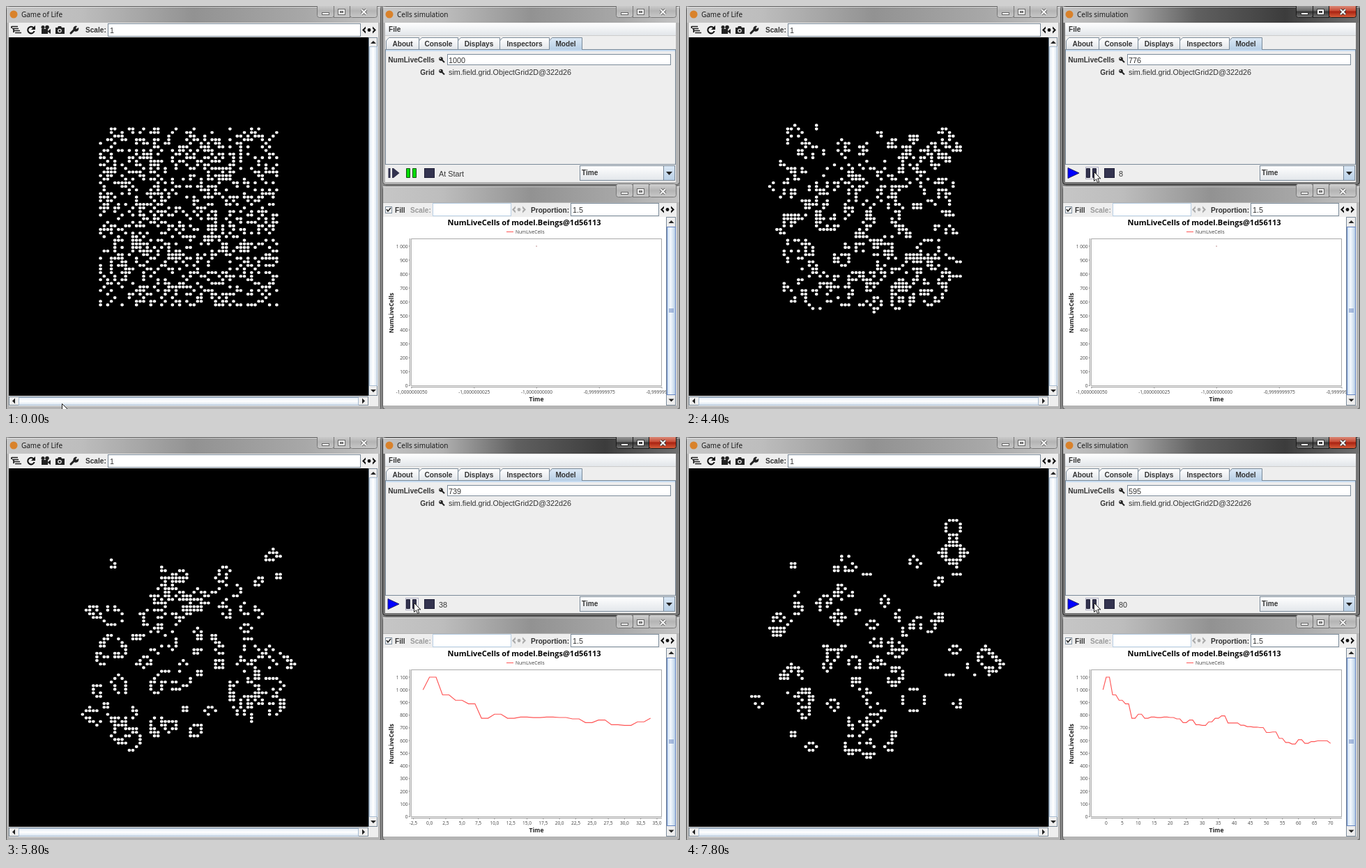
Write an HTML page that moves like this. It is 967x579 px and loops after 8 s.

```html
<!DOCTYPE html>
<html lang="en">
<head>
<meta charset="utf-8">
<title>Cells simulation</title>
<style>
html, body { margin: 0; width: 100%; height: 100%; overflow: hidden; background: #a6a6a6; }
svg { display: block; width: 967px; height: 579px; }
text { font-family: "Liberation Sans", Arial, sans-serif; font-size: 10.8px; fill: #333; white-space: pre; }
.b { font-weight: 700; font-size: 10.1px; }
.ui { font-family: "Open Sans", "Noto Sans", sans-serif; font-size: 10px; fill: #111; }
.tick { font-family: "Open Sans", "Noto Sans", sans-serif; font-size: 6.6px; fill: #404040; }
.axis { font-family: "Open Sans", "Noto Sans", sans-serif; font-size: 8.5px; font-weight: 700; fill: #222; }
</style>
</head>
<body>
<svg id="stage" viewBox="0 0 967 579" xmlns="http://www.w3.org/2000/svg"></svg>
<script>
const LOOP = 8000, TICK = 200;
const GRID = 100, CELL = 5.16, GENS = 42;
const BLUE = '#7a8a99', INK = '#33334f';

// ---------- drawing helpers ----------
const rect = (x, y, w, h, fill, stroke = 'none', more = '') =>
  `<rect x="${x}" y="${y}" width="${w}" height="${h}" fill="${fill}" stroke="${stroke}" ${more}/>`;
const box = (x, y, w, h, fill, stroke, more) => rect(x + .5, y + .5, w - 1, h - 1, fill, stroke, more);
const path = (d, fill = 'none', stroke = 'none', w = 1, more = '') =>
  `<path d="${d}" fill="${fill}" stroke="${stroke}" stroke-width="${w}" ${more}/>`;
const text = (x, y, s, cls = '', more = '') => `<text x="${x}" y="${y}" class="${cls}" ${more}>${s}</text>`;
const mid = 'text-anchor="middle"', end = 'text-anchor="end"';
const gradient = (id, vertical, ...stops) =>
  `<linearGradient id="${id}" x2="${vertical ? 0 : 1}" y2="${vertical ? 1 : 0}">` +
  stops.map(([o, c]) => `<stop offset="${o}" stop-color="${c}"/>`).join('') + '</linearGradient>';

const arrows = {
  up: 'l-4 4h8z', down: 'l-4 -4h8z', left: 'l4 -4v8z', right: 'l-4 -4v8z'
};
const arrow = (x, y, dir) => path(`M${x} ${y}${arrows[dir]}`, '#222');
const eye = (x, y, c) =>
  path(`M${x - 10} ${y}l5 -5v3l-2 2 2 2v3zM${x + 10} ${y}l-5 -5v3l2 2 -2 2v3z`, c) +
  `<circle cx="${x}" cy="${y}" r="2.4" fill="${c}"/>`;
const key = (x, y) => `<circle cx="${x}" cy="${y}" r="2.8" fill="#222"/>` +
  `<circle cx="${x - .8}" cy="${y - .8}" r=".9" fill="#eee"/>` +
  path(`M${x + 1} ${y + 1}l4 4`, 'none', '#222', 2);
const field = (x, y, w, h, stroke = BLUE) => box(x, y, w, h, '#fff', stroke);

function captionButtons(right, y, active) {
  const line = active ? '#1c1c1c' : '#777';
  const face = active ? 'url(#dark)' : 'url(#glass)';
  const x = right - 87;
  const glyph = active ? '#fff' : '#f4f4f4', rim = active ? '#333' : '#666';
  return box(x, y - 3, 25, 20, face, line, 'rx="3"') +
    box(x + 24, y - 3, 24, 20, face, line) +
    box(x + 47, y - 3, 40, 20, active ? 'url(#red)' : face, line, 'rx="3"') +
    box(x + 7, y + 9, 11, 4, glyph, rim) +
    box(x + 30, y + 4, 11, 9, glyph, rim) + box(x + 33, y + 7, 5, 3, active ? '#555' : '#999', rim) +
    path(`M${x + 64} ${y + 5}l7 7m0 -7l-7 7`, 'none', rim, 4) +
    path(`M${x + 64} ${y + 5}l7 7m0 -7l-7 7`, 'none', glyph, 2.2);
}

function frame(x, y, w, h, active) {
  const edge = active ? '#222' : '#555';
  return box(x, y, w, h, active ? '#777' : '#b4b4b4', edge, 'rx="4"') +
    rect(x + 1, y + 1, w - 2, 23, `url(#${active ? 'titleOn' : 'titleOff'})`) +
    rect(x + 1, y + 1, w - 2, 1, '#fff', 'none', 'opacity=".55"') +
    captionButtons(x + w - 5, y, active);
}
const caption = (x, s) => `<circle cx="${x}" cy="12" r="5.5" fill="#d9822b"/>` + text(x + 11, 16, s, 'ui');

// ---------- windows ----------
function worldWindow() {
  const icons =
    path('M8 29.5h9M9 32.5h9M11 35.5h9M13 38.5h9M8 29v3M11 32v6', 'none', '#222', 1.7) +
    path('M39.5 31.2A4.8 4.8 0 1 0 40.6 36', 'none', '#111', 2.1) + path('M42 28v6h-6z', '#111') +
    path('M51 33h9v7h-9zM60 36l4 -3v7l-4 -3z', '#222') +
    '<circle cx="53" cy="30.5" r="2.5" fill="#222"/><circle cx="59" cy="30.5" r="2.8" fill="#222"/>' +
    path('M71 31h3l1 -2h4l1 2h4v9h-13z', '#222') +
    '<circle cx="77" cy="35.5" r="2.8" fill="#eee"/><circle cx="77" cy="35.5" r="1.5" fill="#222"/>' +
    path('M93 39l6 -6', 'none', '#222', 3, 'stroke-linecap="round"') +
    path('M104 31l-3 2 -1 -1 2 -3a4 4 0 1 0 2 2z', '#222');
  return frame(0, 0, 538, 582) + caption(11, 'Game of Life') +
    rect(4, 24, 530, 551, '#eee') + icons + text(114, 38, 'Scale:', 'b') +
    field(146, 25, 363, 19) + text(149, 38.5, '1') + eye(521, 34.5, '#111') +
    rect(4, 45, 516, 515, '#000') +
    box(520, 45, 13, 515, '#eee', BLUE) + box(521, 58, 12, 488, 'url(#track)', '#a9bdd2') +
    arrow(527, 50, 'up') + arrow(527, 555, 'down') +
    box(4, 561, 516, 13, '#eee', BLUE) + box(18, 562, 488, 12, 'url(#trackV)', '#a9bdd2') +
    arrow(9, 567.5, 'left') + arrow(515, 567.5, 'right');
}

function controlWindow() {
  const tabs = [['About', 545, 592], ['Console', 592, 648], ['Displays', 648, 708],
    ['Inspectors', 708, 779], ['Model', 779, 826]];
  return `<g id="idle">${frame(540, 0, 427, 257)}</g><g id="active">${frame(540, 0, 427, 257, true)}</g>` +
    caption(550, 'Cells simulation') +
    rect(544, 24, 417, 229, '#eee') + rect(544, 24, 417, 18, 'url(#menu)') + rect(544, 42, 417, 1, '#ccc') +
    text(549, 37, 'File', 'b') +
    tabs.map(([s, a, b], i) =>
      path(`M${a + .5} 62.5V50l4 -4.5H${b + .5}V62.5`, i === 4 ? 'url(#tabOn)' : 'url(#menu)', BLUE) +
      text((a + b) / 2 + .5, 58, s, 'b', mid)).join('') +
    box(544, 62, 417, 166, '#eee', BLUE) + rect(780, 62, 46, 2, '#b8cfe5') +
    rect(545, 63, 415, 2, '#c8ddf2') +
    text(615, 81, 'NumLiveCells', 'b', end) + key(624, 76) + field(633, 69, 321, 16) +
    text(635, 82, '1000', '', 'id="count"') +
    text(615, 99, 'Grid', 'b', end) + key(624, 93.5) +
    text(635, 99, 'sim.field.grid.ObjectGrid2D@322d26') +
    `<g id="ready">${rect(548.5, 233, 3, 14, INK)}${path('M554 233l2 0 8.5 7 -8.5 7h-2z', INK)}</g>` +
    path('M548 232.5l16 7.5 -16 7.5z', '#00f', '#222266', 1, 'id="playing"') +
    box(573, 231, 19, 18, '#f4f4f4', '#b0b0c4', 'id="focus"') +
    path('M574.5 233.5h5v13h-5zM583.5 233.5h5v13h-5z', '#0d0', '#164f16', 1, 'id="pause"') +
    box(600, 233, 15, 14, INK, '#202038') +
    text(621, 245, 'At Start', '', 'id="clock"') +
    box(823, 229, 137, 22, 'url(#menu)', BLUE) + box(943, 229, 17, 22, 'url(#tabOn)', BLUE) +
    text(826, 243, 'Time', 'b') + path('M947 238h9l-4.5 5z', '#222');
}

function chartWindow() {
  return frame(540, 258, 427, 322) + rect(541, 283, 421, 291, '#eee') +
    box(544, 288, 10, 10, '#fff', BLUE) + path('M546 292l2 3 4 -5', 'none', '#222', 1.6) +
    text(558, 296.5, 'Fill', 'b') + text(580, 296.5, 'Scale:', 'b', 'style="fill:#999"') +
    field(612, 283, 113, 19, '#b8cfe5') + eye(736, 292.5, '#aaa') +
    text(808, 296.5, 'Proportion:', 'b', end) + field(810, 283, 127, 19) + text(813, 297, '1.5') +
    eye(949, 292.5, '#111') +
    rect(541, 303, 407, 271, '#fff') +
    box(947, 303, 14, 271, '#eee', BLUE) + box(948, 317, 13, 242, 'url(#thumb)', '#6382bf') +
    path('M951 435.5h7M951 437.5h7M951 439.5h7', 'none', '#6382bf') +
    arrow(954.5, 308, 'up') + arrow(954.5, 568.5, 'down') +
    text(743.5, 315, 'NumLiveCells of model.Beings@1d56113', 'axis', mid + ' style="font-size:11px;fill:#000"') +
    path('M718 324.5h10', 'none', '#f55') + text(731, 327, 'NumLiveCells', 'tick') +
    text(761, 568, 'Time', 'axis', mid) +
    text(0, 0, 'NumLiveCells', 'axis', mid + ' transform="translate(556 441) rotate(-90)"') +
    '<g id="chart" clip-path="url(#chartClip)"></g>';
}

// ---------- population and chart ----------
const population = [1000, 1100, 960, 918, 890, 776, 808, 776, 785, 781, 785, 782, 771, 742, 762, 725,
  720, 748, 776, 795, 739, 739, 721, 710, 706, 702, 664, 668, 617, 585, 573, 607, 578, 592, 598, 598,
  578, 583, 590, 584, 600, 595];
// the world advances on every second step; step -1 is the start
const generation = step => (step >> 1) + 1;
const refreshes = [10, 22, 34, 47, 59, 70];

function chart(last) {
  const started = last > -1, top = started ? 1100 : 1000;
  const left = 582, width = 359, span = (last + 1) * 1.1, low = -1 - (last + 1) * .05;
  const px = v => left + (v - low) / span * width;
  const py = v => 545.5 - v / top * 200.5;
  let out = box(581, 334, 360, 212, '#fff', '#aaa') +
    path('M579.5 334V546M581 547.5H941', 'none', '#999');
  for (let v = 0; v <= top; v += 100) {
    out += path(`M577.5 ${py(v)}h2`, 'none', '#999') +
      text(576.5, py(v) + 2.5, v < 1000 ? v : '1 ' + String(v).slice(1), 'tick', end);
  }
  const tick = (x, s) => path(`M${x} 547.5v2`, 'none', '#999') + text(x, 556.5, s, 'tick', mid);
  if (!started) {
    ['-1,0000000050', '-1,0000000025', '-1,0000000000', '-0,9999999975', '-0,9999999950']
      .forEach((s, i) => { out += tick(582 + i * 89.75, s); });
    return out + rect(760.5, 344.5, 1.2, 1.2, '#a66');
  }
  const unit = last < 23 ? 1 : last < 50 ? 2.5 : 5;
  for (let v = Math.ceil(low / unit) * unit; v <= low + span; v += unit) {
    out += tick(px(v), unit === 2.5 ? v.toFixed(1).replace('.', ',') : v + 0 || '0');
  }
  const points = [];
  for (let s = -1; s <= last; s++) points.push(px(s).toFixed(1) + ' ' + py(population[generation(s)]).toFixed(1));
  return out + path('M' + points.join('L'), 'none', '#f55', 1.15);
}

// ---------- Game of Life ----------
function random(seed) {
  return () => {
    seed = seed + 0x6D2B79F5 | 0;
    let r = Math.imul(seed ^ seed >>> 15, 1 | seed);
    r = r + Math.imul(r ^ r >>> 7, 61 | r) ^ r;
    return ((r ^ r >>> 14) >>> 0) / 4294967296;
  };
}

function firstWorld() {
  const rnd = random(1970), world = new Uint8Array(GRID * GRID);
  for (let y = 25; y < 75; y++)
    for (let x = 25; x < 75; x++) world[y * GRID + x] = rnd() < .37 ? 1 : 0;
  return world;
}

function evolve(world) {
  const next = new Uint8Array(world.length);
  for (let y = 1; y < GRID - 1; y++) {
    for (let x = 1; x < GRID - 1; x++) {
      const i = y * GRID + x, a = i - GRID, b = i + GRID;
      const n = world[a - 1] + world[a] + world[a + 1] + world[i - 1] + world[i + 1] +
        world[b - 1] + world[b] + world[b + 1];
      next[i] = n === 3 || n === 2 && world[i] ? 1 : 0;
    }
  }
  return next;
}

function worldPath(world) {
  let d = '';
  world.forEach((alive, i) => {
    if (!alive) return;
    const x = 6.3 + (i % GRID) * CELL, y = 47.6 + Math.floor(i / GRID) * CELL;
    d += `M${x.toFixed(1)} ${y.toFixed(1)}h.6`;
  });
  return d;
}

const worlds = [];
for (let w = firstWorld(), g = 0; g < GENS; g++, w = evolve(w)) worlds.push(worldPath(w));

// ---------- scene ----------
const stage = document.getElementById('stage');
stage.innerHTML = '<defs>' +
  gradient('titleOff', false, [0, '#c6c6c6'], [.2, '#bdbdbd'], [.5, '#929292'], [.8, '#a8a8a8'], [1, '#c4c4c4']) +
  gradient('titleOn', false, [0, '#c2c2c2'], [.2, '#b0b0b0'], [.45, '#606060'], [.75, '#3c3c3c'], [1, '#707070']) +
  gradient('glass', true, [0, '#d2d2d2'], [.5, '#b4b4b4'], [1, '#c8c8c8']) +
  gradient('dark', true, [0, '#aaa'], [.5, '#666'], [.55, '#333'], [1, '#777']) +
  gradient('red', true, [0, '#e0a090'], [.5, '#c84a34'], [.55, '#a82010'], [1, '#d8603c']) +
  gradient('menu', true, [0, '#fff'], [1, '#e2e6ea']) +
  gradient('tabOn', true, [0, '#dce9f6'], [1, '#b8cfe5']) +
  gradient('track', false, [0, '#e4edf6'], [.5, '#fff'], [1, '#d4e1ee']) +
  gradient('trackV', true, [0, '#e4edf6'], [.5, '#fff'], [1, '#d4e1ee']) +
  gradient('thumb', false, [0, '#c8ddf2'], [.4, '#f4f9ff'], [1, '#b8cfe5']) +
  '<clipPath id="chartClip"><rect x="541" y="303" width="406" height="270"/></clipPath></defs>' +
  rect(0, 0, 967, 579, '#8c8c8c') + worldWindow() + controlWindow() + chartWindow() +
  path('', 'none', '#fff', 4.1, 'id="cells" stroke-linecap="round"') +
  path('M.5 .5v13l3 -2.8 2 4.8 2.2 -1 -2 -4.6h4.2z', '#fff', '#222', 1, 'id="cursor"');

const el = id => document.getElementById(id);
const [idle, active, ready, playing, focus, pause, clock, count, cells, plot, cursor] =
  ['idle', 'active', 'ready', 'playing', 'focus', 'pause', 'clock', 'count', 'cells', 'chart', 'cursor'].map(el);
const show = (node, on) => node.setAttribute('display', on ? 'inline' : 'none');

// pointer stops, one per tick
const pointer = [[80, 571], [80, 571], [417, 391], [417, 391], [455, 361], [520, 306], [576, 256],
  [609, 236], [599, 233], [587, 238], [585, 238]];
const pace = [[4000, 0], [5000, 20], [6600, 56], [7800, 80]];

function stepAt(t) {
  if (t < pace[0][0]) return -1;
  const i = Math.max(1, pace.findIndex(p => p[0] >= t));
  const [t0, s0] = pace[i - 1], [t1, s1] = pace[i];
  return Math.floor(s0 + (s1 - s0) * (t - t0) / (t1 - t0) + 1e-6);
}

function render(t) {
  const step = stepAt(t), gen = generation(step), running = step >= 0, pressed = t >= 3800;
  show(idle, !pressed);
  show(active, pressed);
  show(focus, pressed);
  show(ready, !running);
  show(playing, running);
  pause.setAttribute('fill', pressed ? INK : '#0d0');
  pause.setAttribute('stroke', pressed ? '#202038' : '#164f16');
  clock.textContent = running ? step : 'At Start';
  count.textContent = population[gen];
  cells.setAttribute('d', worlds[gen]);
  plot.innerHTML = chart(refreshes.filter(s => s <= step).pop() ?? -1);
  const [x, y] = pointer[Math.min(t / TICK, pointer.length - 1)];
  cursor.setAttribute('transform', `translate(${x} ${y})`);
}

let shown = -1;
const start = performance.now();
function loop() {
  const t = Math.floor((performance.now() - start) % LOOP / TICK) * TICK;
  if (t !== shown) render(shown = t);
  requestAnimationFrame(loop);
}
loop();
</script>
</body>
</html>
```
